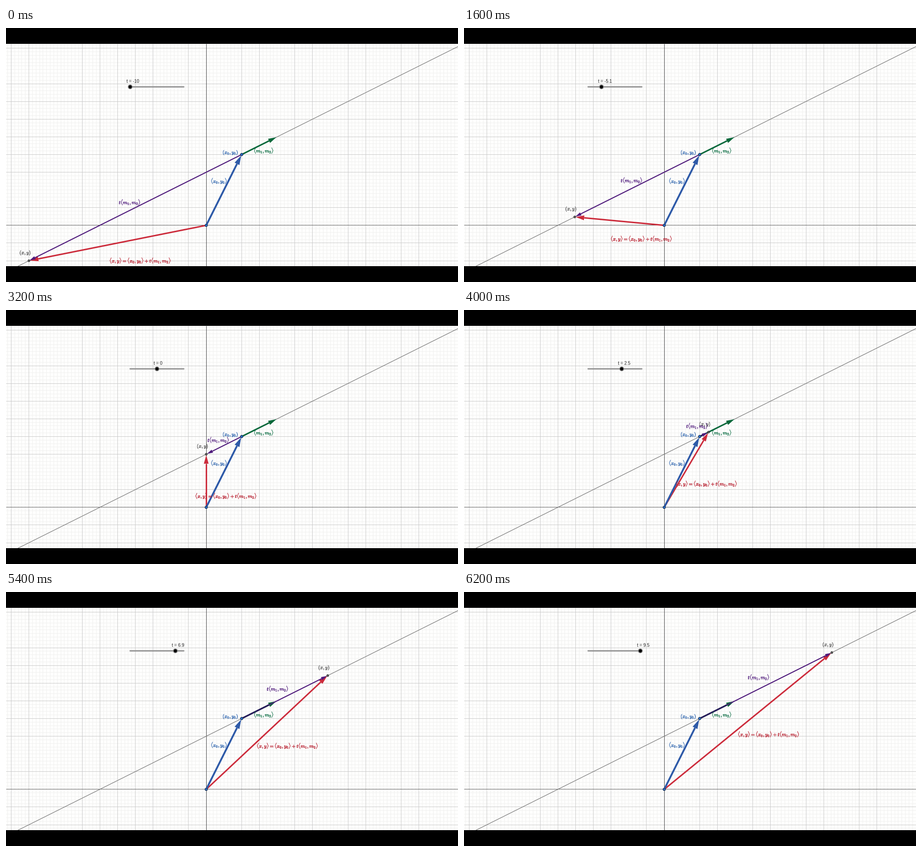
A matplotlib script for the animation above (6.4 s loop, 998x561 px).

```python
import math

import matplotlib.pyplot as plt
import numpy as np
from matplotlib.animation import FuncAnimation
from matplotlib.patches import Circle, Polygon, Rectangle
from matplotlib.patheffects import Normal, Stroke

plt.rcParams["mathtext.fontset"] = "cm"

W, H, DPI = 998, 561, 64
PT = 72 / DPI  # points per pixel
FRAMES, INTERVAL = 32, 200
UNIT = np.array([39.15, 39.1])
ORIGIN = np.array([442.1, 435.85])
TOP, BOTTOM = 35, 526

RED, BLUE, GREEN, PURPLE = "#cc2b3b", "#2e5aa8", "#08683a", "#4f1a7c"
OVERLAP = "#2a1a5c"

fig = plt.figure(figsize=(W / DPI, H / DPI), dpi=DPI, facecolor="#fefefd")
ax = fig.add_axes([0, 0, 1, 1])
ax.set(xlim=(0, W), ylim=(H, 0))
ax.axis("off")


def to_px(x, y):
    return ORIGIN + UNIT * np.array([x, -y])


def unit_vector(start, end):
    delta = end - start
    length = math.hypot(*delta)
    return delta / max(length, 1e-9), length


def math_label(text, x, y, color):
    thicken = [Stroke(linewidth=0.35 * PT, foreground=color), Normal()]
    return ax.text(x - 1, y + 3, f"${text}$", color=color, fontsize=11 * PT,
                   ha="left", va="baseline", zorder=8, path_effects=thicken)


def dot(center, radius, fill, edge, width=1, zorder=9):
    return ax.add_patch(Circle(center, radius, fc=fill, ec=edge,
                               lw=width * PT, zorder=zorder))


class Arrow:
    GAP = 2  # the tip stops just short of the end point

    def __init__(self, color, width, head, zorder):
        self.head = head
        self.shaft, = ax.plot([], [], color=color, lw=width * PT,
                              solid_capstyle="butt", zorder=zorder)
        self.tip = ax.add_patch(Polygon(np.zeros((3, 2)), fc=color, lw=0,
                                        zorder=zorder))

    def place(self, start, end):
        direction, length = unit_vector(start, end)
        tip = end - min(self.GAP, length) * direction
        head = min(self.head, max(length - self.GAP, 0))
        base = tip - head * direction
        side = head * 0.28 * np.array([-direction[1], direction[0]])
        self.shaft.set_data(*zip(start, base))
        self.tip.set_xy([tip, base + side, base - side])
        return base


def label_spot(start, end, base, gap):
    """Middle of a vector, shifted by a fixed offset and along its normal."""
    (dx, dy), _ = unit_vector(start, end)
    return (start + end) / 2 + base + gap * np.array([dy, -dx])


def grid_lines(xs, ys, color, zorder):
    """Lines one pixel wide, each filling the pixel that holds it."""
    left, top = ORIGIN - 0.5
    ax.vlines(left + UNIT[0] * np.array(xs), TOP, BOTTOM,
              color=color, lw=PT, zorder=zorder)
    ax.hlines(top - UNIT[1] * np.array(ys), 0, W,
              color=color, lw=PT, zorder=zorder)


# Grid: some unit lines are as faint as the subdivisions.
grid_lines(np.arange(-57, 72) / 5, np.arange(-11, 52) / 5, "#f0f0ef", 1)
grid_lines([x for x in range(-11, 13) if x not in (-9, -8, -2, 0, 1, 4, 7, 10)],
           [y for y in range(-2, 11) if y not in (0, 2, 9)], "#c9c9c9", 2)
grid_lines([0], [], "#3c3c3c", 2.1)
grid_lines([], [0], "#5a5a5a", 2.1)

# The line y = 3 + x / 2
ax.plot(*zip(to_px(-12, -3), to_px(15, 10.5)), color="#757575",
        lw=1.2 * PT, zorder=3)
for top, height in ((0, TOP), (BOTTOM, H - BOTTOM)):
    ax.add_patch(Rectangle((0, top), W, height, fc="black", lw=0, zorder=20))

# Fixed vectors
anchor = to_px(2, 4)
green = Arrow(GREEN, 3.2, 18, 4)
green_base = green.place(anchor, to_px(4, 5))
red = Arrow(RED, 3.2, 19, 5)
blue = Arrow(BLUE, 4, 21, 5.5)
blue.place(ORIGIN, anchor)
purple = Arrow(PURPLE, 2.2, 13, 6)
overlap, = ax.plot([], [], color=OVERLAP, lw=3.2 * PT,
                   solid_capstyle="butt", zorder=6.5)

math_label(r"(x_0,y_0)", 479, 275, "#2f66b0")
math_label(r"\langle x_0,y_0\rangle", 453, 339, "#2f66b0")
math_label(r"\langle m_1,m_2\rangle", 548, 272, "#0f7046")
dot(ORIGIN, 2.9, "#2a6cc4", "#14253f")
dot(anchor, 2.9, "#2a6cc4", "#14253f")

# Moving parts
point = dot(ORIGIN, 2.2, "#6a6a6a", "#222222")
point_label = math_label(r"(x,y)", 0, 0, "#5c5c5c")
step_label = math_label(r"t\langle m_1,m_2\rangle", 0, 0, PURPLE)
sum_label = math_label(
    r"\langle x,y\rangle=\langle x_0,y_0\rangle+t\langle m_1,m_2\rangle",
    0, 0, "#b81c2c")

ax.plot([274, 392.5], [130, 130], color="#929292", lw=3 * PT,
        solid_capstyle="round", snap=False, zorder=4)
knob = dot((274, 130), 4.3, "black", "#7c7c7c", 1.6)
value_label = ax.text(0, 121, "", fontsize=9.8 * PT, color="#222222",
                      family="Liberation Sans", va="baseline", zorder=8)


def parameter(i):
    t = np.interp(i, [0, 4, 8, 16, 23, 27, 30, 31],
                  [-10, -7.5, -5.05, 0, 4.4, 6.85, 8.85, 9.45])
    return round(t * 20) / 20


def one_decimal(t):
    return math.copysign(math.floor(abs(t) * 10 + 0.5 + 1e-9) / 10, t)


def update(i):
    t = parameter(i)
    end = to_px(t, 3 + t / 2)

    red.place(ORIGIN, end)
    base = purple.place(anchor, end)
    if t > 2:
        stop = min(base, green_base, key=lambda p: p[0])
        overlap.set_data(*zip(anchor, stop))
    else:
        overlap.set_data([], [])

    point.center = end
    point_label.set_position(end + (-21, -14.5))
    step_label.set_position(label_spot(anchor, end, (-38, -11), 3.6))
    sum_label.set_position(label_spot(ORIGIN, end, (-19.1, 37.7), 5.4))

    knob_x = 274.2 + 5.92 * (t + 10)
    knob.center = (knob_x, 130)
    value_label.set_x(knob_x - 7.8)
    value_label.set_text(f"t = {one_decimal(t):g}")
    return []


anim = FuncAnimation(fig, update, frames=FRAMES, interval=INTERVAL,
                     repeat=True, repeat_delay=0)
plt.show()
```
